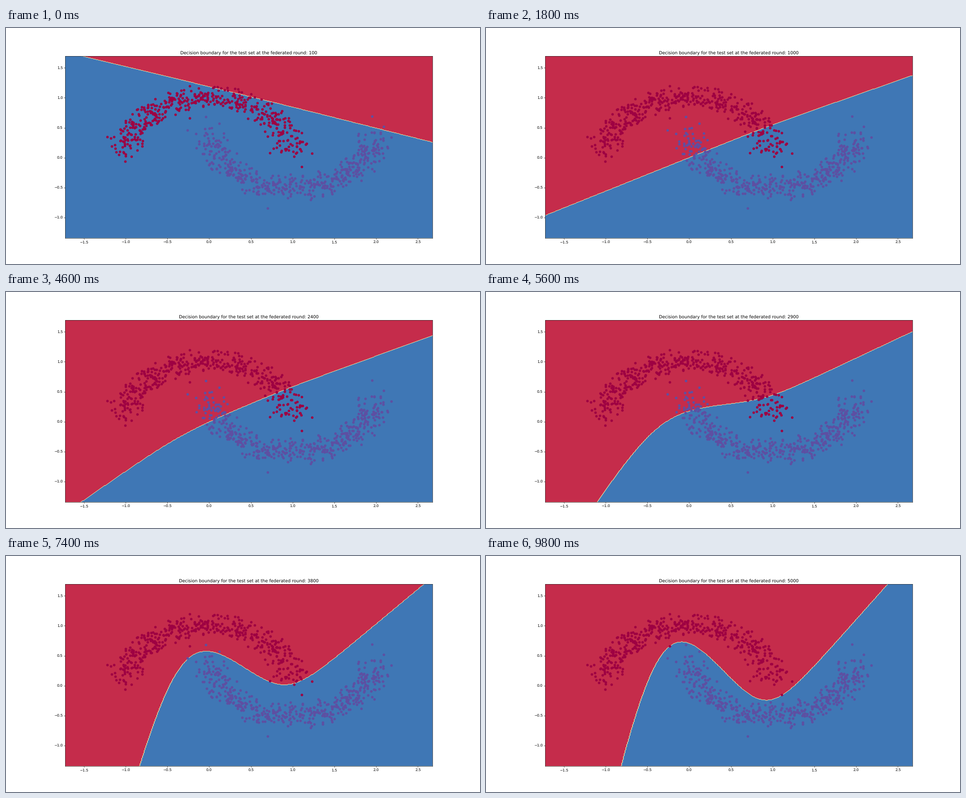
Recreate the animation shown at these times as a matplotlib script. Size 1058 by 529 pixels, loop 10 s.

```python
import matplotlib.pyplot as plt
import numpy as np
from matplotlib.animation import FuncAnimation

FRAMES, INTERVAL = 50, 200
XLIM, YLIM = (-1.722, 2.676), (-1.339, 1.692)
LEVELS = np.arange(0, 1.06, 0.15)
CMAP = plt.get_cmap("Spectral")

plt.rcParams["font.family"] = "DejaVu Sans"
plt.rcParams["text.hinting"] = "none"

# The boundary is a line with two soft bends, fixed by its height at four x.
ANCHORS = np.array([-0.8, -0.1, 0.9, 2.4])
STAGES = {  # round: heights at the anchors
    100: (1.455, 1.22, 0.88, 0.355),
    500: (-0.31, 0.005, 0.49, 1.075),
    1600: (-0.535, -0.08, 0.515, 1.32),
    2400: (-0.64, -0.07, 0.53, 1.3),
    3400: (-0.93, 0.413, 0.185, 1.38),
    4200: (-1.39, 0.667, -0.12, 1.622),
    5000: (-1.27, 0.731, -0.238, 1.73),
}


def hinge(x, at, width):
    """Zero right of `at`, falling straight towards it from the left."""
    return width * np.logaddexp(0, (at - x) / width)


def basis(x):
    return np.column_stack([np.ones_like(x), x,
                            hinge(x, -0.345, 0.21), hinge(x, 0.91, 0.16)])


def ease_tangents(t, values):
    """Rates of change that pass each stage smoothly without overshoot."""
    d = np.diff(values, axis=0) / np.diff(t)[:, None]
    same = d[:-1] * d[1:] > 0
    total = np.where(same, d[:-1] + d[1:], 1)
    inner = np.where(same, 2 * d[:-1] * d[1:] / total, 0)
    return np.vstack([1.5 * d[:1], inner, 0.6 * d[-1:]])


def boundary(rnd):
    k = min(np.searchsorted(rounds, rnd, side="right") - 1, len(rounds) - 2)
    h = rounds[k + 1] - rounds[k]
    s = (rnd - rounds[k]) / h
    now = ((1 + 2 * s) * (1 - s)**2 * heights[k]
           + s * (1 - s)**2 * h * rates[k]
           + s**2 * (3 - 2 * s) * heights[k + 1]
           + s**2 * (s - 1) * h * rates[k + 1])
    return basis(xs) @ np.linalg.solve(basis(ANCHORS), now)


def moon(rng, lower, strays, count=480, spread=0.1, reach=0.225):
    """Half circle of noisy points, plus a few strays at its edges."""
    angle = rng.uniform(0.035 * np.pi, 0.965 * np.pi, 2 * count)
    noise = rng.normal(0, spread, (2 * count, 2))
    keep = np.flatnonzero(np.hypot(*noise.T) < reach)[:count]
    arc = np.column_stack([np.cos(angle), np.sin(angle)])
    if lower:
        arc = (1, 0.5) - arc
    return np.vstack([(arc + noise)[keep], strays])


xs = np.arange(XLIM[0], XLIM[1] + 0.01, 0.01)
ys = np.arange(YLIM[0], YLIM[1] + 0.01, 0.01)
rounds = np.array(list(STAGES), float)
heights = np.array(list(STAGES.values()))
rates = ease_tangents(rounds, heights)

fig, ax = plt.subplots(figsize=(18, 9), dpi=1058 / 18)
ax.set_facecolor(CMAP(0.5))
ax.set(xlim=XLIM, ylim=YLIM,
       xticks=np.arange(-1.5, 2.6, 0.5), yticks=np.arange(-1, 1.6, 0.5))

rng = np.random.default_rng(7)
upper = moon(rng, False, [(-1.22, 0.35), (-0.23, 1.2), (-0.23, 0.66),
                          (0.73, 0.08), (1.11, -0.15), (1.23, 0.07)])
lower = moon(rng, True, [(-0.26, 0.46), (-0.04, 0.68), (0.43, -0.59),
                         (0.7, -0.84), (1.95, 0.69), (2.18, 0.34)])
ax.scatter(*upper.T, color=CMAP(0.0), zorder=2)
ax.scatter(*lower.T, color=CMAP(1.0), zorder=2)

regions = []


def update(i):
    rnd = 100 * (i + 1)
    while regions:
        regions.pop().remove()
    labels = (ys[:, None] <= boundary(rnd)).astype(float)
    regions.append(ax.contourf(xs, ys, labels, levels=LEVELS, cmap=CMAP,
                               antialiased=True, zorder=0))
    ax.set_title("Decision boundary for the test set "
                 f"at the federated round: {rnd}")
    return []


anim = FuncAnimation(fig, update, frames=FRAMES, interval=INTERVAL,
                     init_func=lambda: [], repeat=True, repeat_delay=0)
plt.show()
```
